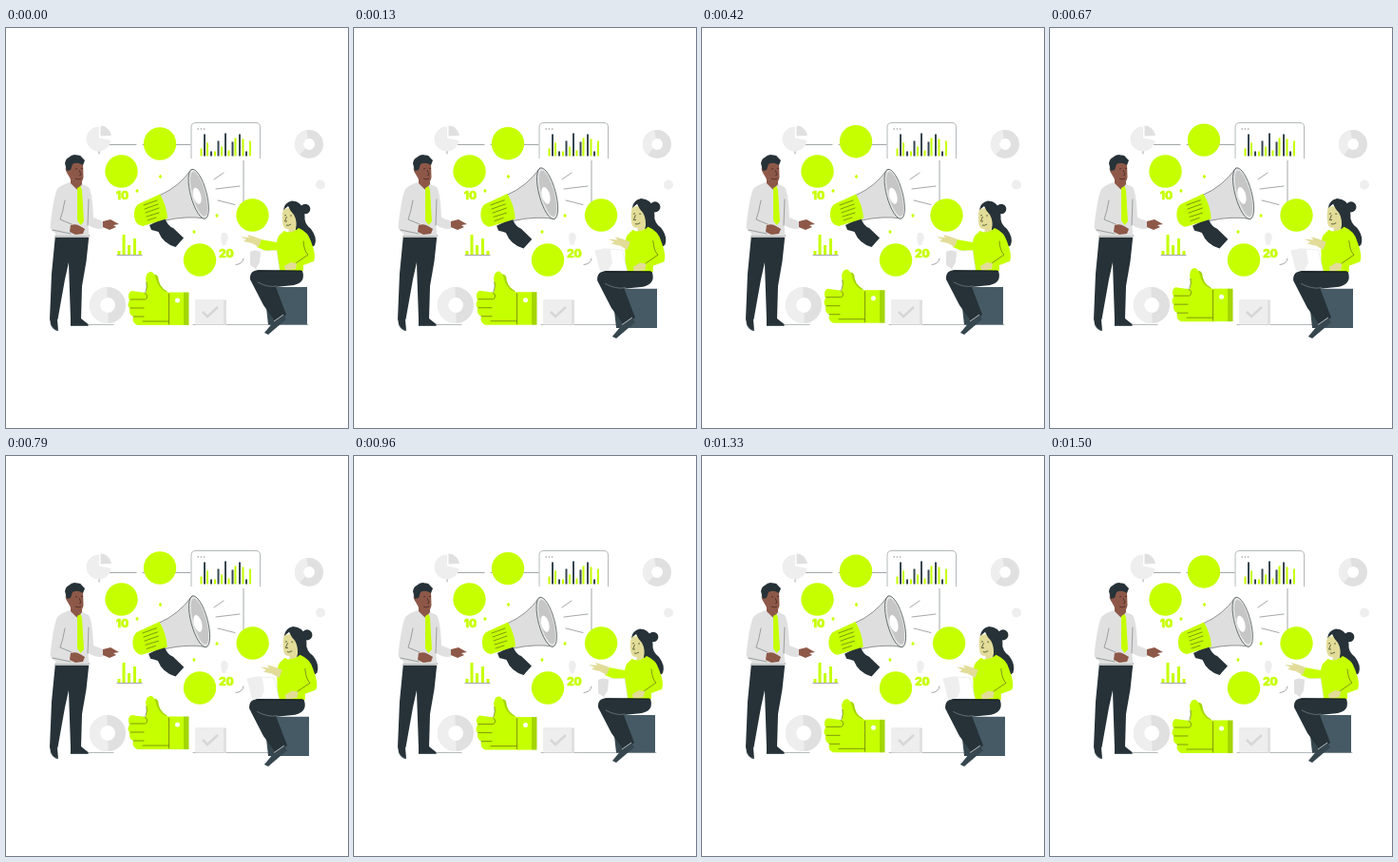
An HTML page for the animation above (1540 ms loop, 360x420 px).

```html
<!DOCTYPE html>
<html lang="en">
<head>
<meta charset="utf-8">
<title>Marketing team</title>
<style>
html,body{margin:0;width:100%;height:100%;overflow:hidden;background:#fff}
svg{display:block;width:100vw;height:100vh}
.lime{fill:#c6ff00}.shade{fill:#a3d600}.dark{fill:#263238}.slate{fill:#37474f}.steel{fill:#455a64}
.white{fill:#fff}.pale{fill:#eee}.grey{fill:#e0e0e0}.brown{fill:#8d5848}.skin{fill:#e2dc98}
.line{fill:none;stroke:#7b8285;stroke-width:.7;stroke-linecap:round;stroke-linejoin:round}
.crease{fill:none;stroke:#4c5a18;stroke-width:.6;stroke-linecap:round}
.num{font:900 11.5px Inter,"Open Sans",sans-serif;text-anchor:middle;stroke:#c6ff00;stroke-width:.5}
</style>
</head>
<body>
<svg viewBox="0 0 360 420" xmlns="http://www.w3.org/2000/svg">
<rect class="white" width="360" height="420"/>

<g id="backdrop">
  <path class="line" d="M98 132V130Q99 123 107 122.500H137M144 122.500H194M250 138V196M250 242Q249 248 242 248.500"/>
  <path class="line" stroke-opacity=".8" d="M68 311.500H113M197 311.500H318"/>
  <path class="pale" d="M98 115.500V103.500A13 13 0 1 0 110.500 118Z"/>
  <path class="grey" d="M99.500 113.500V102.500A12 12 0 0 1 111 113Z"/>
  <g fill="none">
    <circle cx="319" cy="122" r="10.500" stroke="#e0e0e0" stroke-width="9"/>
    <path d="M312 130A10.500 10.500 0 0 1 317 111.700" stroke="#eee" stroke-width="9"/>
    <circle cx="107" cy="291" r="13.500" stroke="#e0e0e0" stroke-width="11"/>
    <path d="M107.500 304.500A13.500 13.500 0 1 1 106.500 277.500" stroke="#eee" stroke-width="11"/>
  </g>
  <circle cx="331" cy="164.500" r="5" class="pale"/>
  <path class="pale" d="M227 216Q230 213 233 217Q235 221 232 225L231 228H228Q225 221 227 216Z"/>
  <rect class="pale" x="199" y="285" width="33" height="26.500" rx="1.500"/>
  <path class="grey" d="M229 286H232V311.500H229Z"/>
  <path d="M207 298L212 303L223 293" fill="none" stroke="#d6d6d6" stroke-width="2.500"/>
</g>

<g id="card">
  <path class="white" d="M195 139V104Q195 99.500 200 99.500H263Q267.500 99.500 267.500 104V139Z"/>
  <path d="M195 137V104Q195 99.500 200 99.500H263Q267.500 99.500 267.500 104V137" fill="none" stroke="#a3a8aa" stroke-width=".8"/>
  <path d="M201.500 106H209.500" stroke="#b0b0b0" stroke-width="1.300" stroke-dasharray="1.500 1.700"/>
</g>

<g id="mini"><path class="line" d="M117 238.500H143"/></g>
<text class="num lime" x="122.500" y="180">10</text>
<text class="num lime" x="232" y="240.500">20</text>

<g id="man">
  <path class="dark" d="M52 217H87.500L84.500 245L80 271L79 306H68L66.500 262L66 246L62 264L54.500 306H46L48 258Z"/>
  <path class="dark" d="M46 305L54 306L55 318Q50 318 47 311ZM68 306L79 305L86.500 311V313H68Z"/>
  <path d="M47 311Q50 318 55 317M68 312.500H86" fill="none" stroke="#5b6a72" stroke-width=".7"/>
  <path class="brown" d="M68 153L80 157V165L75 170L68 166Z"/>
  <path d="M67 162Q57 165 53.500 170Q49 183 46.500 209Q48 214 52 215V220H87.500L86.500 207Q97 213 103 210L102 203L92 199Q91 173 87 167L80 164L75 170Z" fill="#e0e0e0"/>
  <path class="lime" d="M75 168L78.500 166L80 170L82 203L78.500 207L75 202Z"/>
  <path class="line" d="M62 181Q60 193 57 201L69 206M87 180L86 207M49 212L68 216M52 219H86"/>
  <path class="brown" d="M68 207Q74 205 78 208L83 211L81 216L73 217L67 214Z"/>
  <path class="brown" d="M102 203L110 201L119 206L113 207L116 209L109 212L102 209Z"/>
  <path class="brown" d="M66 140Q76 137 81 141L81.500 157Q80 164 75 164Q69 163 67 157L63.500 151Q61 145 66 146Z"/>
  <path class="dark" d="M64 150L62 142Q63 137 66 136Q70 132 75 133.500Q79 133 80 136L83 139L81 144Q75 140 70 143L68 149Z"/>
  <path d="M73 148L75 147.500M79 147.500H81M77 149L79 154L77 155M73 158Q76 160 79 158" fill="none" stroke="#4a2924" stroke-width=".8"/>
</g>

<g id="horn">
  <path class="dark" d="M151 207L167 199Q170 208 176 210L187 220.500L178.500 230Q165 226 160.500 214Q157 213 153 212Z"/>
  <path d="M161 176Q182 167 195.500 148L210 200Q190 197 168 202Z" fill="#dedede" stroke="#55595a" stroke-width=".6"/>
  <path class="lime" d="M139 185L162 174.500Q169 186 170 200L144 208Q136 207 135 198Q134 189 139 185Z"/>
  <path class="crease" d="M145 186L159 181M146 190L160 185M147 194L161 189M148 198L161 194M149 202L158 199"/>
  <g transform="translate(202.700 174.300) rotate(-15)">
    <ellipse rx="8.400" ry="26.800" fill="#e4e4e4" stroke="#596063" stroke-width=".8"/>
    <ellipse cx=".3" rx="6.600" ry="24" fill="#c6c6c6"/>
    <ellipse cx="-2" cy="1.500" rx="4" ry="8.800" fill="#fff"/>
  </g>
</g>
<g id="sparks" class="lime"></g>
<path id="rays" class="line" d="M219 159L229 152M221 169L246 166M223 181L241 185.500"/>

<g id="thumb">
  <path class="shade" d="M154 262Q156 256 160 261Q161 272 169 276L172 281H156Z"/>
  <path class="lime" d="M147 278Q149 273 147 263Q148 255 153.500 256Q157 258 159 267Q163 277 173 278V312H138Q132 309 134 303Q129 301 130 294Q127 291 130 286Q127 279 132 276Z"/>
  <path class="crease" d="M147 277Q149 272 148 267M131 285H146M131 294H145M134 303H145M146 278Q151 281 147 285"/>
  <path class="lime" d="M172 277.500H187V312H172Z"/>
  <path class="shade" d="M187 277.500H192.500V312H187Z"/>
  <path class="crease" d="M171.500 279V311M144 308H171"/>
  <circle cx="180.500" cy="286" r="2.500" class="white"/>
</g>

<g id="badges"></g>

<g id="woman">
  <path class="steel" d="M284 272H317V311.500H276V279Z"/>
  <path class="slate" d="M272 276L284 272V311.500H276Z"/>
  <path class="dark" d="M304 183Q314 186 314 197Q314 206 321 211Q328 220 325 228Q321 232 316 228L304 212Z"/>
  <circle class="dark" cx="315" cy="190" r="5.300"/>
  <path class="skin" d="M292 190Q290 197 291.500 206Q292 211 297.500 211V216L304 217L306 207L306 188Z"/>
  <path class="dark" d="M292 191Q293 183 301 181.500Q311 182 314 192Q316 205 310 214L305 213Q307 203 303 196Q299 192 297 187Z"/>
  <path d="M293 197L295 196.500M299 197H301M295.500 198L293.500 203L296 203M295 207Q297 208 300 206" fill="none" stroke="#46502a" stroke-width=".8"/>
  <path class="lime" d="M292 213Q300 217 308 210Q318 214 321 224Q327 239 324 245L313 249V255H285L285 232Z"/>
  <path class="crease" d="M313 224Q314 235 318 238L305 247M287 228L287 235"/>
  <path id="sleeve" class="lime"/>
  <path id="palm" class="skin"/>
  <path class="skin" d="M293 250L300 246L306 247L305 253L294 255Z"/>
  <path class="dark" d="M257 264Q256 254 267 254L312 255Q316 267 303 270L284 272L295 301L284 309L271 291Z"/>
  <path class="line" d="M265 267Q276 273 285 271"/>
  <path class="slate" d="M272 320L282 308L292 301L295 306Q284 315 276 322Z"/>
  <path d="M282 308L292 301" stroke="#d9d9d9" stroke-width=".8"/>
  <path id="lid" class="white" stroke="#dedede" stroke-width=".5"/>
  <path id="lobe"/>
  <path d="M264 255H311" stroke="#111a1e" stroke-width="1.200"/>
</g>
</svg>

<script>
const LOOP = 1540, BEATS = [0, 540, 1080];
const el = id => document.getElementById(id);
const mix = (a, b, k) => a + (b - a) * k;
const ease = (t, a, b) => {
  const k = Math.min(1, Math.max(0, (t - a) / (b - a)));
  return k * k * (3 - 2 * k);
};

function bars(id, base, width, list) {
  el(id).insertAdjacentHTML('beforeend', list.map(([x, h, dark]) =>
    `<rect class="${dark ? 'slate' : 'lime'}" x="${x}" y="${base - h}" width="${width}" height="${h}"/>`).join(''));
}
bars('card', 134.5, 2, [
  [204.5, 8], [208, 23, 1], [211, 14], [215, 5, 1], [219, 5], [222.5, 16, 1], [226, 10],
  [230, 24, 1], [233.5, 6], [237.5, 15, 1], [240.5, 19], [245, 23, 1], [248.5, 18],
  [252, 5, 1], [256, 16]
]);
bars('mini', 238, 3, [[117.5, 4], [122.5, 21], [128, 10], [134, 17], [139.5, 4]]);

el('sparks').innerHTML = [[162.5, 156], [138, 171], [198, 214], [222, 197]].map(([x, y]) =>
  `<path d="M${x} ${y - 2.2}L${x + 1.8} ${y}L${x} ${y + 2.2}L${x - 1.8} ${y}Z"/>`).join('');

el('badges').innerHTML = [[162, 121.5], [121.5, 150.5], [204, 243.5], [259.5, 196.5]].map(([x, y]) =>
  `<circle class="lime" cx="${x}" cy="${y}" r="17.2"/>`).join('');
const riser = el('badges').firstElementChild, slider = el('badges').lastElementChild;

// Sideways drift of the right-hand badge: [time, offset]
const DRIFT = [[0, 0], [250, 1], [420, -2], [670, 0], [1170, 1], [LOOP, 0]];
function drift(t) {
  const i = DRIFT.findIndex(p => p[0] > t);
  const [a, from] = DRIFT[i - 1], [b, to] = DRIFT[i];
  return mix(from, to, ease(t, a, b));
}

const move = (node, x, y) => node.setAttribute('transform', `translate(${x} ${y})`);
const scaleAt = (node, x, y, s) =>
  node.setAttribute('transform', `translate(${x} ${y}) scale(${s}) translate(${-x} ${-y})`);

function arm(k) {
  const x = mix(259, 280, k), y = mix(222, 225, k);
  const ex = mix(281, 287, k), ey = mix(237, 243, k);
  el('sleeve').setAttribute('d',
    `M294 213Q286 216 285 225L${x + 9} ${y}L${x + 5} ${y + 8}L${ex} ${ey}Q293 241 296 230Z`);
  el('palm').setAttribute('d',
    `M${x + 10} ${y}L${x + 2} ${y - 3}L${x - 5} ${y - 5}L${x - 3} ${y - 2}L${x - 12} ${y - 3}` +
    `L${x - 6} ${y}L${x - 9} ${y + 2}L${x} ${y + 4}L${x + 7} ${y + 8}Z`);
}

function laptop(open) {
  el('lid').setAttribute('d', open
    ? 'M255 234L264 232L282 233L287 254H260Z'
    : 'M267 234L285 233.5L288 254H263Z');
  el('lobe').setAttribute('d', open
    ? 'M255 234L264 232L270 232.5L272 246L268 254H260Z'
    : 'M257 235Q262 232 268 235L267 246L263 253L257 249Z');
  el('lobe').setAttribute('class', open ? 'pale' : 'grey');
}

function draw(t) {
  const p = t - BEATS.filter(b => b <= t).pop();
  const fall = 1 - ease(p, 270, 400);
  const wave = ease(p, 30, 88) * fall;
  const pulse = ease(p, 88, 130) * fall;
  const lift = 2 * (Math.cos(t / LOOP * 2 * Math.PI) - 1);

  scaleAt(el('woman'), 275, 235, 1 + .047 * pulse);
  scaleAt(el('horn'), 178, 188, 1 + .035 * pulse);
  move(el('thumb'), 0, lift);
  move(riser, 0, lift);
  move(slider, drift(t), 0);
  arm(wave);
  laptop(pulse > .5);
}

const start = performance.now();
function tick() {
  draw((performance.now() - start) % LOOP);
  requestAnimationFrame(tick);
}
draw(0);
tick();
</script>
</body>
</html>
```
